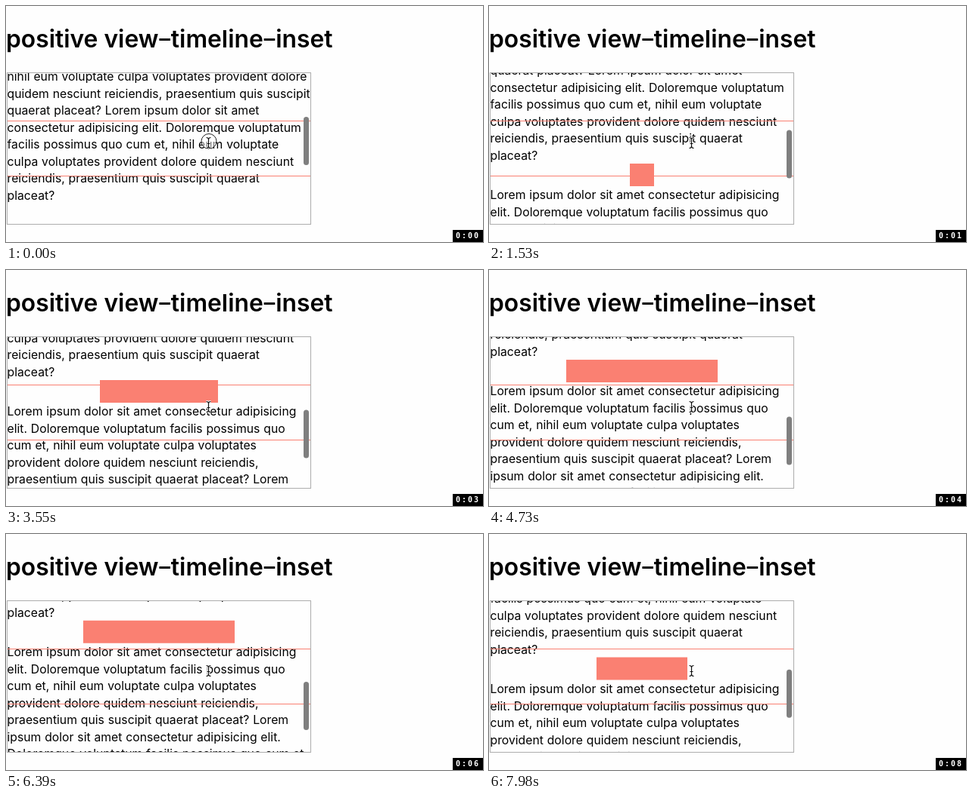
These frames come from a looping animation (630 by 313 pixels, 8 s). An HTML page:

```html
<!DOCTYPE html>
<html lang="en">
<head>
<meta charset="utf-8">
<title>positive view-timeline-inset</title>
<style>
  html, body { margin: 0; width: 100%; height: 100%; overflow: hidden; background: #fefefe; }
  body { position: relative; color: #000; font-family: Inter, "Liberation Sans", sans-serif; font-optical-sizing: none; }
  body * { position: absolute; margin: 0; }
  h1 { left: 0; top: 25px; font-size: 31.8px; font-weight: 600; line-height: 38px; white-space: pre; }
  h1 span { position: relative; top: -2px; font: bold 29.5px/0 "Liberation Sans", sans-serif; }
  #view { left: 1px; top: 88px; width: 400px; height: 200px; border: 1px solid #adadad; overflow: hidden; }
  #content { left: 0; top: 0; width: 400px; }
  p { left: -.5px; font-size: 15.75px; line-height: 22.5px; word-spacing: .4px; white-space: pre; }
  #before { bottom: -1.1px; }
  #after { top: 31.3px; }
  #subject { top: 0; height: 30px; background: salmon; }
  .inset { left: 0; width: 400px; height: 1px; background: salmon; }
  #start { top: 63px; }
  #end { top: 136px; }
  #thumb { left: 391px; top: 0; width: 7px; height: 64px; border-radius: 3.5px; background: #7f7f7f; }
  #pointer { left: 255px; top: 167px; }
  #clock { left: 590px; top: 297px; width: 40px; height: 16px; background: #000; color: #fff;
    font: bold 10px/15px "DejaVu Sans Mono", monospace; letter-spacing: 2px; text-indent: 4px; white-space: pre; }
</style>
</head>
<body>
<h1>positive view<span>–</span>timeline<span>–</span>inset</h1>
<div id="view">
  <div id="content">
    <p id="before">nihil eum voluptate culpa voluptates provident dolore
quidem nesciunt reiciendis, praesentium quis suscipit
quaerat placeat? Lorem ipsum dolor sit amet
consectetur adipisicing elit. Doloremque voluptatum
facilis possimus quo cum et, nihil eum voluptate
culpa voluptates provident dolore quidem nesciunt
reiciendis, praesentium quis suscipit quaerat
placeat?</p>
    <div id="subject"></div>
    <p id="after">Lorem ipsum dolor sit amet consectetur adipisicing
elit. Doloremque voluptatum facilis possimus quo
cum et, nihil eum voluptate culpa voluptates
provident dolore quidem nesciunt reiciendis,
praesentium quis suscipit quaerat placeat? Lorem
ipsum dolor sit amet consectetur adipisicing elit.
Doloremque voluptatum facilis possimus quo cum et,
nihil eum voluptate culpa voluptates provident dolore</p>
  </div>
  <div id="start" class="inset"></div>
  <div id="end" class="inset"></div>
  <div id="thumb"></div>
</div>
<svg id="pointer" width="26" height="26" fill="none">
  <defs>
    <path id="beam" d="M9.5 7.5q3 0 3 2.5v9q0 2.5-3 2.5M15.5 7.5q-3 0-3 2.5M12.5 19q0 2.5 3 2.5M10.5 15.5h4"/>
  </defs>
  <circle id="press" cx="13" cy="12.5" r="10" fill="#fff" fill-opacity=".5" stroke="#222"/>
  <use href="#beam" stroke="#fff" stroke-width="3"/>
  <use href="#beam" stroke="#111" stroke-width="1.2"/>
</svg>
<div id="clock">0:00</div>
<script>
  const LOOP = 8000;
  const FIRST = 261.5; // subject top on the stage before scrolling
  const COVER = 102;   // scroll distance over which the subject grows
  // Each leg reaches y at its end in a number of equal wheel flicks
  const legs = [
    { end: 2270, y: 191.5, flicks: 4 },
    { end: 3550, y: 146, flicks: 3 },
    { end: 5900, y: 98.5, flicks: 5 },
    { end: LOOP, y: 163.5, flicks: 4 }
  ];
  const el = id => document.getElementById(id);
  const clamp = (v, lo, hi) => Math.min(hi, Math.max(lo, v));
  const smooth = k => k * k * (3 - 2 * k);

  // Rest, flick, rest: one unit per period
  function flicked(n) {
    const whole = Math.floor(n);
    return whole + smooth(clamp((n - whole - 0.1) / 0.55, 0, 1));
  }

  function subjectTop(t) {
    let begin = 0, from = FIRST;
    for (const { end, y, flicks } of legs) {
      if (t < end) return from + (y - from) * flicked((t - begin) / (end - begin) * flicks) / flicks;
      begin = end;
      from = y;
    }
    return from;
  }

  function draw(t) {
    const y = subjectTop(t);
    const width = 200 * clamp((225.2 - y) / COVER, 0, 1);
    el("content").style.transform = `translateY(${y - 89}px)`;
    el("thumb").style.transform = `translateY(${58 + (FIRST - y) / 3}px)`;
    el("subject").style.width = width + "px";
    el("subject").style.left = 200 - width / 2 + "px";
    el("press").style.opacity = t < 60 ? 1 : 0;
    el("clock").textContent = "0:0" + Math.floor((t + 170) / 1000);
  }

  const origin = performance.now();
  function frame() {
    draw((performance.now() - origin) % LOOP);
    requestAnimationFrame(frame);
  }
  draw(0);
  requestAnimationFrame(frame);
</script>
</body>
</html>
```
